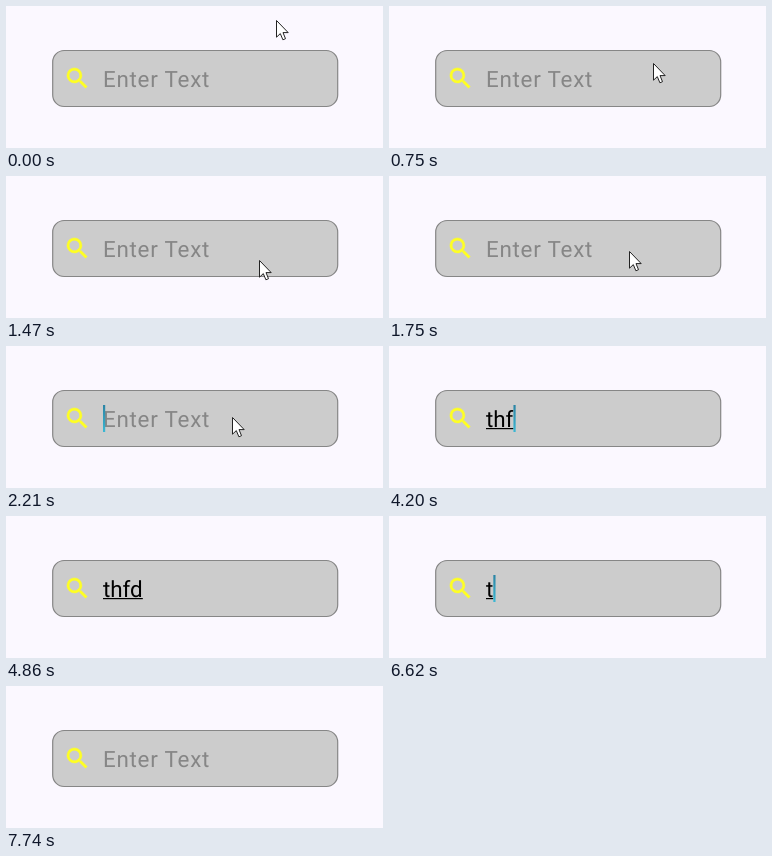
Animation, 377 px wide and 142 px high, one loop 8000 ms. Source, as an HTML page:

```html
<!DOCTYPE html>
<html lang="en">
<head>
<meta charset="utf-8">
<title>Search field</title>
<style>
  html, body { margin: 0; width: 100%; height: 100%; overflow: hidden; background: #fbf8ff; }
  svg { display: block; }
  text { font: 22.4px Roboto, sans-serif; text-rendering: geometricPrecision; }
  #hint { fill: #868686; letter-spacing: .77px; }
</style>
</head>
<body>
<svg width="377" height="142" viewBox="0 0 377 142">
  <defs>
    <linearGradient id="teal" x2="0" y2="1">
      <stop stop-color="#2b84a4"/>
      <stop offset="1" stop-color="#3ab8d4"/>
    </linearGradient>
  </defs>
  <rect x="46.7" y="44.5" width="285" height="56" rx="11.5" fill="#ccc" stroke="#868686" stroke-width="1.2"/>
  <path transform="translate(57.4 58.4) scale(1.16)" fill="#ff2" stroke="#ff2" stroke-width=".4" d="M15.5 14h-.79l-.28-.27A6.47 6.47 0 0 0 16 9.5 6.5 6.5 0 1 0 9.5 16c1.61 0 3.09-.59 4.23-1.57l.27.28v.79l5 4.99L20.49 19zm-6 0a4.5 4.5 0 1 1 0-9 4.5 4.5 0 0 1 0 9z"/>
  <text id="hint" x="96.9" y="80.5">Enter Text</text>
  <text id="typed" x="96.9" y="80.5"></text>
  <rect id="line" x="97" y="82" height="1.2"/>
  <rect id="caret" y="59" width="2.2" height="27" fill="url(#teal)"/>
  <path id="mouse" fill="#fff" stroke="#222" d="M.5.5V17.2L4.3 13.6 6.9 19.8 9.5 18.7 7 12.6H12.2Z"/>
</svg>
<script>
const $ = id => document.getElementById(id);
const LOOP = 8000, STEP = 67, WORD = 'thfd', LEFT = 97;

// pointer strokes: start time, number of steps, end point
const strokes = [
  [70, 4, 265, 53], [670, 6, 255, 85], [1470, 3, 241, 75],
  [1750, 4, 230, 74], [2210, 1, 226, 71], [2270, 3, 220, 150]
];
const typed = [3010, 3660, 4200, 4340];
const erased = [5480, 6020, 6620, 7220];
const caretSpans = [[1950, 2410], [3070, 4860], [5480, 7740]];

const passed = (times, t) => times.filter(s => s <= t).length;
const show = (el, on) => el.setAttribute('visibility', on ? 'visible' : 'hidden');

function pointer(t) {
  let x = 270, y = 14;
  for (const [start, steps, endX, endY] of strokes) {
    if (t < start) break;
    const step = Math.min(steps, Math.floor((t - start) / STEP) + 1);
    const ease = (step / steps) ** 2;
    x += (endX - x) * ease;
    y += (endY - y) * ease;
  }
  return [Math.round(x), Math.round(y)];
}

function draw(t) {
  const count = passed(typed, t) - passed(erased, t);
  $('mouse').setAttribute('transform', `translate(${pointer(t)})`);
  $('typed').textContent = WORD.slice(0, count);
  const width = count && $('typed').getComputedTextLength();
  $('line').setAttribute('width', width);
  $('caret').setAttribute('x', LEFT + width);
  show($('hint'), !count);
  show($('caret'), caretSpans.some(([on, off]) => t >= on && t < off));
}

const start = performance.now();
function frame() {
  draw((performance.now() - start) % LOOP);
  requestAnimationFrame(frame);
}
frame();
</script>
</body>
</html>
```
